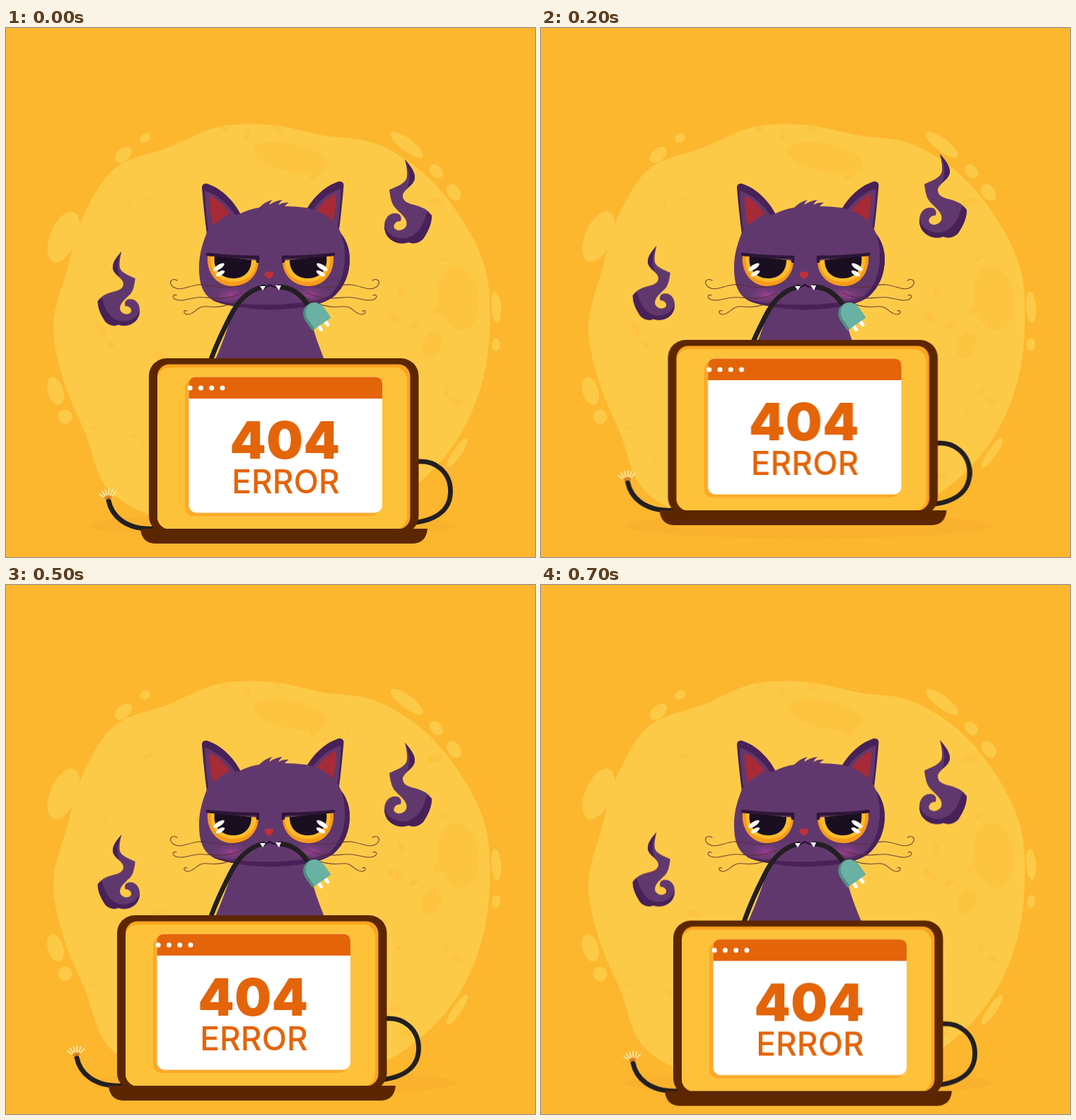
Write an HTML page that moves like this. It is 748 by 748 pixels and loops after 0.8 s.

```html
<!DOCTYPE html>
<html lang="en">
<head>
<meta charset="utf-8">
<title>404 error</title>
<style>
  html, body { margin: 0; width: 100%; height: 100%; overflow: hidden; background: #fcb72f; }
  svg { display: block; width: 100vw; height: 100vh; }
  text { font-family: Inter, Roboto, sans-serif; fill: #e46409; text-anchor: middle; }
  .line, .cable { fill: none; stroke-linecap: round; stroke-linejoin: round; }
  .cable { stroke: #221f22; stroke-width: 6.8; }
  .fur { fill: #61386d; }
  .dark { fill: #472158; }
</style>
</head>
<body>
<svg viewBox="0 0 748 748" xmlns="http://www.w3.org/2000/svg">
  <defs>
    <clipPath id="moonClip"><path id="moon"/></clipPath>
    <clipPath id="headClip"><use href="#head"/></clipPath>
    <radialGradient id="blush">
      <stop offset="0" stop-color="#a8429a" stop-opacity=".8"/>
      <stop offset="1" stop-color="#61386d" stop-opacity="0"/>
    </radialGradient>
    <path id="head" d="M284 289C280 300 273 317 273 338C273 362 278 379 297 387C320 395 345 397 380 397C415 397 443 394 463 380C479 366 486 347 486 327C486 312 481 300 474 291C466 270 446 259 424 254Q408 252 394 252Q396 249 400 247Q393 246 385 250Q387 246 391 243Q381 244 372 250Q373 246 377 243Q367 245 358 254Q344 256 330 263C310 267 293 275 284 289Z"/>

    <g id="flame">
      <path class="fur" d="M564 186C571 194 579 203 578 213C576 224 562 228 561 237C561 244 567 248 577 250Q595 254 602 265C602 277 597 287 590 298C584 304 577 306 569 303Q560 306 551 303C541 299 535 291 535 280C535 268 543 261 551 262C558 262 560 268 558 273C551 273 547 278 549 283C553 288 562 287 566 280C569 271 560 264 553 257C545 250 544 242 542 229C552 224 566 220 567 210Q568 201 564 186Z"/>
      <path class="dark" d="M564 186C571 194 579 203 578 213Q576 220 567 226Q575 209 564 186Z"/>
      <path class="dark" d="M602 265C602 277 597 287 590 298C584 304 577 306 569 303Q560 306 551 303C541 299 535 291 535 280Q543 299 566 297Q588 292 595 260Z"/>
    </g>

    <g id="ear">
      <path class="dark" d="M284 292Q280 262 277 226Q277 219 284 220C306 227 323 246 332 264L310 284Z"/>
      <path class="fur" d="M287 290Q282 262 281 230Q308 239 325 266L310 284Z"/>
      <path fill="#a62b37" d="M288 237Q287 258 293 280Q302 270 316 263Q307 246 288 237Z"/>
    </g>

    <g id="eye">
      <path fill="#f79b1b" d="M285 322C283 346 298 365 320 365C340 365 357 351 357 329Z"/>
      <path fill="#fdbb2b" d="M290 322C287 344 301 358 320 359C339 359 353 349 354 329Z"/>
      <path fill="#1a0f20" d="M295 322C292 342 305 354 321 354C337 354 347 344 347 328Z"/>
      <path class="line" stroke="#2e1638" stroke-width="4.5" d="M285 320Q320 324 356 324V330"/>
      <g fill="#fff">
        <ellipse cx="301" cy="338" rx="9" ry="3.2" transform="rotate(-33 301 338)"/>
        <ellipse cx="303" cy="347" rx="7" ry="2.8" transform="rotate(-30 303 347)"/>
      </g>
    </g>

    <g id="whiskers" class="line" stroke="#5b2d32" stroke-width="1.1" opacity=".85">
      <path d="M336 362C305 373 288 361 272 363S247 373 236 366C228 358 236 353 242 357"/>
      <path d="M334 375C303 388 287 379 271 381S250 387 240 384C233 380 237 376 241 378"/>
      <path d="M345 376C322 392 302 396 286 394S269 403 258 405C249 404 251 398 256 400"/>
    </g>
  </defs>

  <rect width="748" height="748" fill="#fcb72f"/>
  <use href="#moon" fill="#fdca48"/>
  <g id="craters" clip-path="url(#moonClip)" fill="#fdc440"></g>
  <g id="drops" fill="#fdca48"></g>
  <ellipse cx="378" cy="704" rx="260" ry="18" fill="#fab22e"/>

  <g id="flames">
    <use href="#flame"/>
    <use href="#flame" transform="translate(662.5 151.5) scale(-.885 .885)"/>
  </g>

  <g id="cat">
    <path class="fur" d="M326 385C317 415 309 440 287 490H459C444 455 432 425 425 385Z"/>
    <path class="dark" d="M318 392Q373 405 432 392V388H318Z"/>
    <use href="#ear"/>
    <use href="#ear" transform="translate(754.5 -3) scale(-1 1)"/>
    <use href="#head" class="fur"/>
    <g clip-path="url(#headClip)">
      <path class="dark" d="M472 285C485 320 480 358 458 378C425 394 330 396 285 382V410H500V285Z"/>
      <ellipse cx="318" cy="377" rx="34" ry="16" fill="url(#blush)"/>
      <ellipse cx="430" cy="377" rx="34" ry="16" fill="url(#blush)"/>
    </g>
    <use href="#whiskers"/>
    <use href="#whiskers" transform="translate(760) scale(-1 1)"/>
    <use href="#eye"/>
    <use href="#eye" transform="translate(748) scale(-1 1)"/>
    <path fill="#bd313c" d="M366 346Q371 343 377 345Q380 347 376 352Q372 357 368 352Q364 348 366 346Z"/>

    <path class="cable" d="M364 366C344 370 328 386 317 408C305 432 295 452 283 488"/>
    <path class="cable" d="M387 366C407 367 419 379 428 393"/>
    <path class="line" stroke="#2a1334" stroke-width="2.4" d="M357 368Q366 368 373 363Q380 368 390 366"/>
    <path fill="#fff" d="M359 365H367L363 371ZM381 364H389L386 371Z"/>

    <g transform="translate(445 417) rotate(-35)">
      <path class="line" stroke="#fff" stroke-width="5" d="M-5 0V8M6.500 0V8"/>
      <path fill="#4c9083" d="M-16 2V-13C-16 -38 16 -38 16 -13V2Z"/>
      <path fill="#69b1a3" d="M-12 2V-13C-12 -35 16 -38 16 -13V2Z"/>
    </g>
  </g>

  <g id="laptop">
    <path class="cable" d="M576 614C607 608 628.500 629 628.500 655C628.500 683 606 697 572 700"/>
    <path class="cable" d="M145 668C149 688 167 710 210 708"/>
    <g id="spark" class="line" stroke="#fff3c4" stroke-width="1.5"></g>

    <rect x="202" y="467" width="381.500" height="248" rx="25" fill="#5c2600"/>
    <rect x="214" y="475.500" width="357.500" height="233" rx="17" fill="#fba31f"/>
    <rect x="214" y="480" width="353" height="228.500" rx="17" fill="#fdc23a"/>
    <path fill="#5c2600" d="M190 708H596Q594 729 574 729H212Q192 729 190 708Z"/>

    <rect x="253" y="497" width="275" height="193" rx="12" fill="#fba92b"/>
    <rect x="258.500" y="493.500" width="273.500" height="192" rx="11" fill="#fff"/>
    <path fill="#e46409" d="M258.500 524V504.500Q258.500 493.500 269.500 493.500H521Q532 493.500 532 504.500V524Z"/>
    <path class="line" stroke="#fff" stroke-width="7" stroke-dasharray="0 15.250" d="M260.250 509H310"/>
    <text x="394.500" y="608.500" font-size="73" font-weight="900" letter-spacing=".5">404</text>
    <text x="395.500" y="657.500" font-size="46" font-weight="500">ERROR</text>
  </g>
</svg>
<script>
  const NS = 'http://www.w3.org/2000/svg';
  const CENTER = [375, 420];
  const $ = id => document.getElementById(id);

  function add(parent, tag, attrs) {
    const el = document.createElementNS(NS, tag);
    for (const key in attrs) el.setAttribute(key, attrs[key]);
    parent.append(el);
  }

  function polar(deg, dist, [x, y] = CENTER) {
    const a = deg * Math.PI / 180;
    return [x + dist * Math.cos(a), y + dist * Math.sin(a)];
  }

  function oval(parent, [cx, cy], rx, ry, turn) {
    add(parent, 'ellipse', { cx, cy, rx, ry, transform: `rotate(${turn} ${cx} ${cy})` });
  }

  // Closed smooth curve through the points
  function smooth(points) {
    const n = points.length;
    const at = i => points[(i + n) % n];
    const toward = (p, a, b) => p.map((v, k) => v + (b[k] - a[k]) / 6);
    const curves = points.map((p, i) => {
      const next = at(i + 1);
      return `C${toward(p, at(i - 1), next)} ${toward(next, at(i + 2), p)} ${next}`;
    });
    return `M${at(0)}${curves.join('')}Z`;
  }

  // Moon radius at even angles, clockwise from the right
  const radii = [309, 309, 309, 306, 300, 295, 292, 295, 316, 327, 304, 304,
                 308, 299, 307, 313, 290, 290, 283, 278, 296, 304, 308, 313];
  $('moon').setAttribute('d', smooth(radii.map((r, i) => polar(i * 360 / radii.length, r))));

  // Drops lie along a ring: angle, half length, half width
  [
    [-131, 14, 9], [-124, 8, 6], [-157, 38, 19], [163, 20, 11], [156, 10, 10], [-53, 28, 9],
    [-43, 11, 8], [-36, 13, 9], [-4.5, 22, 7], [5, 9, 6], [34.5, 25, 6]
  ].forEach(([deg, rx, ry]) => oval($('drops'), polar(deg, 319), rx, ry, deg + 90));

  let seed = 17;
  const random = () => (seed = seed * 16807 % 2147483647) / 2147483647;

  oval($('craters'), [402, 183], 54, 20, 12);
  oval($('craters'), [640, 382], 29, 46, -8);
  oval($('craters'), [602, 448], 13, 20, 25);
  for (let i = 0; i < 85; i++) {
    const deg = random() * 360;
    const dist = 120 + 170 * Math.sqrt(random());
    const size = 1 + 7 * random() ** 3;
    oval($('craters'), polar(deg, dist), size * 1.6, size * .8, random() * 180);
  }

  // Frayed wire end
  for (let deg = -145; deg <= -50; deg += 19) {
    const root = [145, 668];
    add($('spark'), 'path', { d: `M${polar(deg, 3, root)}L${polar(deg, 7, root)}`, stroke: '#d9792b' });
    add($('spark'), 'path', { d: `M${polar(deg, 8, root)}L${polar(deg, 16, root)}` });
  }

  // Held poses, 100 ms each
  function shake(id, poses) {
    const frames = [...poses, poses[0]].map(([x, y]) => ({
      transform: `translate(${x}px, ${y}px)`, easing: 'steps(1, end)'
    }));
    $(id).animate(frames, { duration: poses.length * 100, iterations: Infinity });
  }
  shake('laptop', [[0, 0], [-45, 0], [-22.5, -26], [-15, 7.5]]);
  shake('flames', [[0, 0], [0, 37], [0, -8], [0, 33.5]]);
</script>
</body>
</html>
```
